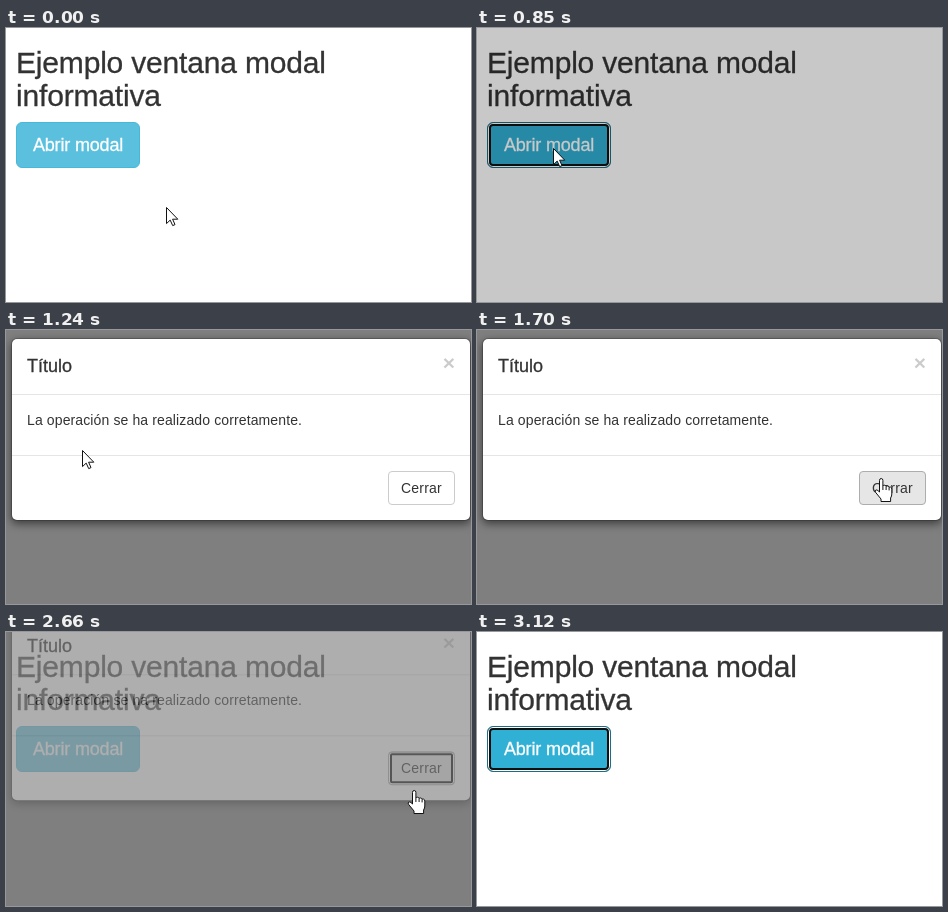
An HTML page that plays this animation: 465x274 px, repeating every 3350 ms.

```html
<!DOCTYPE html>
<html lang="es">
<head>
<meta charset="utf-8">
<title>Ventana modal</title>
<style>
* { box-sizing: border-box; margin: 0; }
html, body { width: 100%; height: 100%; overflow: hidden; background: #fff; }
body { position: relative; font: 14px/20px "Liberation Sans", Arial, sans-serif; color: #333; }
h2 { position: absolute; left: 10px; top: 18px; font: 500 30px/33px "Liberation Sans", Arial, sans-serif; letter-spacing: -.18px; white-space: nowrap; }
h2, h4, #open { -webkit-text-stroke: .3px; }
.btn { position: absolute; border: 1px solid; text-align: center; white-space: nowrap; }
.focus { box-shadow: inset 0 0 0 1px #fff, inset 0 0 0 3px #101010; }

#open { left: 10px; top: 94px; width: 124px; height: 46px; border-radius: 6px; font-size: 18px; line-height: 44px; letter-spacing: -.17px; color: #fff; background: #5bc0de; border-color: #46b8da; }
#open.hover { background: #31b0d5; border-color: #269abc; }
#open.focus { background: #31b0d5; border-color: #1b6d85; }
#open.active { background: #269abc; }

#backdrop { position: absolute; inset: 0; background: #000; }
#modal { position: absolute; left: 5px; top: 8px; width: 460px; height: 183px; background: #fff; background-clip: padding-box; border: 1px solid rgba(0,0,0,.2); border-radius: 6px; box-shadow: 0 3px 9px rgba(0,0,0,.5); }
#modal h4 { position: absolute; left: 15px; top: 15px; font-weight: 500; font-size: 18px; line-height: 25.7px; }
#modal p { position: absolute; left: 15px; top: 71px; letter-spacing: .12px; white-space: nowrap; }
#modal hr { position: absolute; left: 0; right: 0; height: 1px; border: 0; background: #e5e5e5; }
#modal b { position: absolute; right: 15px; top: 13px; font-size: 21px; line-height: 21px; opacity: .2; color: #000; }
#close { left: 376px; top: 132px; width: 67px; height: 34px; border-radius: 4px; line-height: 32px; letter-spacing: .2px; background: #fff; border-color: #ccc; }
#close.hover { background: #e6e6e6; border-color: #adadad; }
#close.active { background: #d4d4d4; border-color: #8c8c8c; }

svg { position: absolute; left: 0; top: 0; width: 100%; height: 100%; }
#arrow, #hand { fill: #fff; stroke: #111; stroke-linejoin: round; }
</style>
</head>
<body>
<h2>Ejemplo ventana modal<br>informativa</h2>
<div class="btn" id="open">Abrir modal</div>
<div id="backdrop"></div>
<div id="modal">
  <h4>Título</h4><b>×</b>
  <hr style="top:55px">
  <p>La operación se ha realizado corretamente.</p>
  <hr style="top:116px">
  <div class="btn" id="close">Cerrar</div>
</div>
<svg>
  <g id="cursor">
    <circle id="press" cy="2" r="13" fill="#ebe614" fill-opacity=".8"/>
    <path id="arrow" d="M.5 .5V16.6L4.2 13.1 6.7 18.6 9 17.6 6.6 12.2H11.8Z"/>
    <path id="hand" transform="translate(-6.5)" d="M5 2.5q0-2 1.7-2t1.7 2V8q.3-.8 1.6-.8t1.6 1.3q.4-.6 1.6-.5t1.4 1.4q.4-.5 1.4-.3 1.3.3 1.3 2V16q0 2-1.2 4V23.5H6.5V21L1.2 14.5q-1.2-1.7 0-2.4 1.2-.7 2.4.6L5 14ZM8.4 8v4M11.6 8.5v3.5M14.6 9.4v3"/>
  </g>
</svg>
<script>
const LOOP = 3350, STEP = 78.25, OFFSET = 11;   // the picture refreshes every STEP ms
const FADE = 150, SLIDE = 300;
const OPEN = 770, SHOW = 940, HIDE = 2555, CLOSED = 2722;

const $ = id => document.getElementById(id);
const ramp = (t, start, length) => Math.min(1, Math.max(0, (t - start) / length));
const within = (t, a, b) => t >= a && t < b;
const toggle = (id, on) => $(id).style.display = on ? '' : 'none';
const smooth = k => k * k * (3 - 2 * k);
const easeOut = k => 1 - (1 - k) ** 1.7;

function setState(id, states) {
  for (const name in states) $(id).classList.toggle(name, states[name]);
}

// The pointer glides from one resting place to the next.
function pointer(t) {
  let x = 160, y = 179;
  const glide = (from, to, toX, toY) => {
    const k = smooth(ramp(t, from, to - from));
    x += (toX - x) * k;
    y += (toY - y) * k;
  };
  glide(0, 450, 76, 120);
  glide(1240, 1632, 404, 148);
  glide(1632, 1950, 413, 153);
  glide(HIDE, 2806, 396, 169);
  glide(2806, 3119, 407, 283);
  return [Math.round(x), Math.round(y)];
}

function draw(t) {
  const [x, y] = pointer(t);
  const overOpen = t < OPEN && within(x, 10, 134) && within(y, 94, 140);
  const overClose = within(t, SHOW + SLIDE, HIDE + FADE) && within(x, 382, 449) && within(y, 141, 175);
  const pressOpen = within(t, 610, OPEN), pressClose = within(t, 2330, HIDE);

  setState('open', { hover: overOpen, focus: within(t, 610, SHOW + SLIDE) || t > 2950, active: pressOpen });
  setState('close', { hover: overClose, focus: t > 2330, active: pressClose });

  $('backdrop').style.opacity = .5 * (ramp(t, OPEN + 15, FADE) - ramp(t, CLOSED, FADE));
  $('modal').style.opacity = ramp(t, SHOW, FADE) - ramp(t, HIDE, FADE);
  const lift = 1 - easeOut(ramp(t, SHOW, SLIDE)) + easeOut(ramp(t, HIDE, SLIDE));
  $('modal').style.transform = `translateY(${-25 * lift}%)`;

  $('cursor').setAttribute('transform', `translate(${x} ${y})`);
  toggle('press', pressOpen || pressClose);
  toggle('hand', overOpen || overClose);
  toggle('arrow', !overOpen && !overClose);
}

function frame() {
  const now = performance.now() % LOOP;
  draw(Math.max(0, Math.floor((now + OFFSET) / STEP) * STEP - OFFSET));
  requestAnimationFrame(frame);
}
frame();
</script>
</body>
</html>
```
